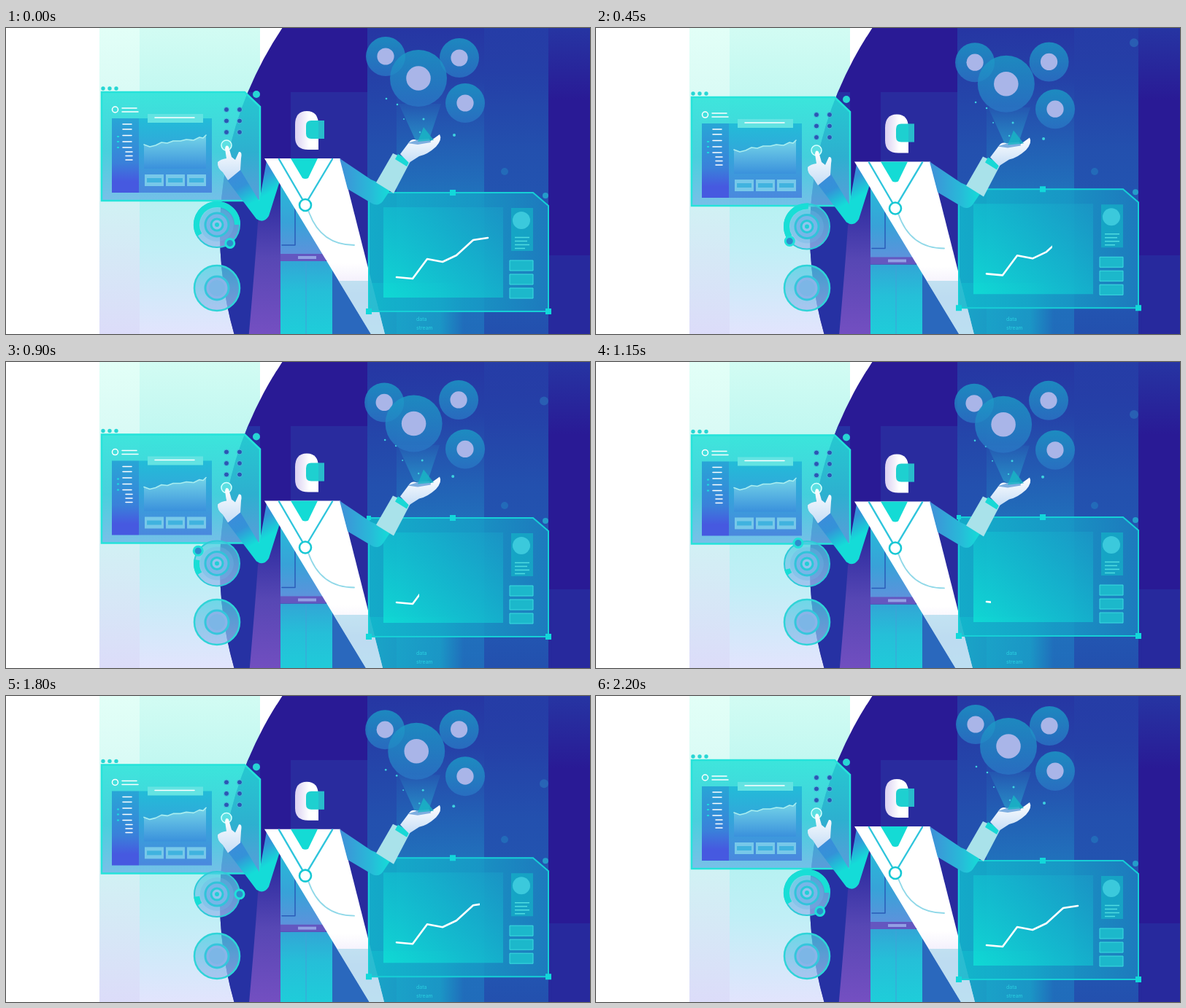
Animation of 800 by 420 pixels, one loop 2.25 s. Source, as an HTML page:

```html
<!DOCTYPE html>
<html lang="en">
<head>
<meta charset="utf-8">
<title>Robot with floating panels</title>
<style>
  html, body { margin: 0; width: 100%; height: 100%; overflow: hidden; background: #fff; }
  svg { display: block; width: 800px; height: 420px; }
  .line { fill: none; stroke-linecap: round; stroke-linejoin: round; }
  text { font: 7px Inter, sans-serif; fill: #2ad0e0; }
</style>
</head>
<body>
<svg viewBox="0 0 800 420">
  <defs>
    <linearGradient id="column" x2="0" y2="1">
      <stop stop-color="#d2fcf3"/><stop offset=".45" stop-color="#b0f3ef"/>
      <stop offset=".72" stop-color="#c0eff6"/><stop offset="1" stop-color="#e2e4fd"/>
    </linearGradient>
    <linearGradient id="edge" x2="0" y2="1">
      <stop stop-color="#e2fff7"/><stop offset=".5" stop-color="#cff5f3"/><stop offset="1" stop-color="#dcdcf9"/>
    </linearGradient>
    <linearGradient id="beam" x2="0" y2="1">
      <stop stop-color="#2636a3"/><stop offset=".4" stop-color="#2350ae"/>
      <stop offset=".8" stop-color="#225ab4"/><stop offset="1" stop-color="#2350ae"/>
    </linearGradient>
    <linearGradient id="core" x2="0" y2="1">
      <stop stop-color="#2468b8" stop-opacity="0"/><stop offset=".45" stop-color="#207cc0" stop-opacity=".75"/>
      <stop offset="1" stop-color="#1f78c0" stop-opacity=".7"/>
    </linearGradient>
    <linearGradient id="floorGlow">
      <stop stop-color="#18b4cc" stop-opacity=".85"/><stop offset=".75" stop-color="#18a8ca" stop-opacity=".7"/>
      <stop offset="1" stop-color="#18a8ca" stop-opacity="0"/>
    </linearGradient>
    <linearGradient id="haze" x2="0" y2="1">
      <stop stop-color="#2540a8" stop-opacity=".7"/><stop offset="1" stop-color="#2540a8" stop-opacity="0"/>
    </linearGradient>
    <linearGradient id="cape" x2="0" y2="1">
      <stop offset=".15" stop-color="#2b2b9f"/><stop offset=".5" stop-color="#5747b4"/><stop offset="1" stop-color="#7a51c4"/>
    </linearGradient>
    <linearGradient id="body" x2="0" y2="1">
      <stop stop-color="#23c0d8"/><stop offset=".6" stop-color="#38a2d8"/><stop offset="1" stop-color="#5d92dc"/>
    </linearGradient>
    <linearGradient id="legs" x2="0" y2="1">
      <stop stop-color="#32a6d6"/><stop offset=".35" stop-color="#25bfd8"/><stop offset="1" stop-color="#1cd2da"/>
    </linearGradient>
    <linearGradient id="cloth" x2="0" y2="1">
      <stop stop-color="#fff"/><stop offset=".55" stop-color="#fff"/><stop offset=".72" stop-color="#ece6fa"/>
      <stop offset="1" stop-color="#e8f4fc"/>
    </linearGradient>
    <linearGradient id="helmet"><stop stop-color="#d9d0f1"/><stop offset=".6" stop-color="#fff"/></linearGradient>
    <linearGradient id="rightArm"><stop stop-color="#3f8fd8"/><stop offset=".6" stop-color="#28bad8"/><stop offset="1" stop-color="#13dfd8"/></linearGradient>
    <linearGradient id="leftArm" x2=".5" y2="1"><stop stop-color="#4188dc"/><stop offset=".45" stop-color="#3492d8"/><stop offset=".75" stop-color="#14dcd8"/></linearGradient>
    <linearGradient id="skin" x2="0" y2="1"><stop stop-color="#fff"/><stop offset="1" stop-color="#c5ddf6"/></linearGradient>
    <linearGradient id="leftGlass" x2="0" y2="1">
      <stop stop-color="#25e2d8" stop-opacity=".86"/><stop offset=".55" stop-color="#2fc8d8" stop-opacity=".84"/>
      <stop offset="1" stop-color="#66b4e6" stop-opacity=".82"/>
    </linearGradient>
    <linearGradient id="menu" x2="0" y2="1">
      <stop stop-color="#28a6d6"/><stop offset=".6" stop-color="#3a80da"/><stop offset=".85" stop-color="#4659e0"/>
    </linearGradient>
    <linearGradient id="screen" x2="0" y2="1"><stop stop-color="#22bcd8"/><stop offset="1" stop-color="#4a88de"/></linearGradient>
    <linearGradient id="area" x2="0" y2="1"><stop stop-color="#75d5e8"/><stop offset="1" stop-color="#3a91dc"/></linearGradient>
    <linearGradient id="rightGlass">
      <stop stop-color="#11b8cc" stop-opacity=".86"/><stop offset=".6" stop-color="#169fc7" stop-opacity=".82"/>
      <stop offset="1" stop-color="#1c82c0" stop-opacity=".82"/>
    </linearGradient>
    <linearGradient id="plot" y1="1" y2="0">
      <stop stop-color="#0fe0d6" stop-opacity=".85"/><stop offset=".6" stop-color="#13bdd0" stop-opacity=".6"/>
      <stop offset="1" stop-color="#1a9cc8" stop-opacity=".55"/>
    </linearGradient>
    <linearGradient id="coin" x2="0" y2="1"><stop stop-color="#1b9cc6" stop-opacity=".8"/><stop offset="1" stop-color="#2a74c4" stop-opacity=".8"/></linearGradient>
    <linearGradient id="cone" x2="0" y2="1"><stop stop-color="#2a9fce" stop-opacity=".1"/><stop offset="1" stop-color="#2aa6d0" stop-opacity=".65"/></linearGradient>
    <linearGradient id="dial" x2="0" y2="1"><stop stop-color="#47cfe0" stop-opacity=".7"/><stop offset="1" stop-color="#9cb8ec" stop-opacity=".75"/></linearGradient>
    <path id="robe" d="M354 179H458L524 440H512Z"/>
    <clipPath id="robeClip"><use id="robeClipShape" href="#robe"/></clipPath>
    <clipPath id="disc"><circle cx="798" cy="281" r="505"/></clipPath>
    <clipPath id="drawn"><rect id="reveal" x="530" y="270" height="100"/></clipPath>
  </defs>

  <!-- Backdrop -->
  <path fill="url(#edge)" d="M128 0h55v420h-55z"/>
  <path fill="url(#column)" d="M183 0h165v420H183z"/>
  <g clip-path="url(#disc)">
    <path fill="#291a95" d="M280 0h520v420H280z"/>
    <path fill="#2638a8" opacity=".75" d="M280 88h68v332h-68z"/>
    <path fill="#2a30a1" opacity=".8" d="M390 88h105v332H390z"/>
    <path fill="url(#beam)" d="M495 0h248v420H495z"/>
    <path fill="url(#haze)" d="M655 0h145v100H655z"/>
    <path fill="url(#core)" d="M535 70h120v350H535z"/>
    <path fill="url(#floorGlow)" d="M497 350h130v70H497z"/>
    <path fill="#2540a8" opacity=".4" d="M743 312h57v108h-57z"/>
  </g>
  <circle id="mote" cx="737" r="6" fill="#2e84c4"/>
  <circle cx="683" cy="197" r="5" fill="#2389c6" opacity=".45"/>

  <!-- Left panel -->
  <g id="leftPanel">
    <path d="M131 88H327L348 108V237H131Z" fill="url(#leftGlass)" stroke="#25e3da" stroke-width="2.500"/>
    <g fill="#27d6d4"><circle cx="133" cy="83" r="2.700"/><circle cx="142" cy="83" r="2.700"/><circle cx="151" cy="83" r="2.700"/><circle cx="343" cy="91" r="5"/></g>
    <g class="line" stroke="#fff" stroke-width="1.500"><circle cx="149.500" cy="112" r="4"/><path d="M159 110h20M159 115h22"/></g>
    <path fill="url(#menu)" d="M145 124h37v102h-37z"/>
    <path fill="url(#screen)" d="M182 124h100v102H182z"/>
    <path fill="#63e3e2" d="M194 118h76v12h-76z"/>
    <path class="line" stroke="#fff" stroke-width="1.500" d="M204 123h54M160 132h12M160 139h12M160 147.500h12M160 156h12M160 164h12M164 170h9M164 175.500h9M164 181h9"/>
    <path fill="#1fd9dd" d="M152 148h3v2h-3zM152 155h3v2h-3zM152 163h3v2h-3z"/>
    <path fill="url(#area)" d="M189 160l8 3 8-2 8-4 8 1 8-3 10 0 8-2 10 1 8-4 5 1 4-4V193H189Z"/>
    <path class="line" stroke="#a9eef0" stroke-width="1.600" d="M189 160l8 3 8-2 8-4 8 1 8-3 10 0 8-2 10 1 8-4 5 1 4-4"/>
    <g id="tabs"></g>
    <g id="knobs" fill="#2c56b4" stroke="#49c4de"></g>
    <circle cx="302" cy="161" r="7" fill="#5ce0e2" stroke="#d5ffff" stroke-width="1.500"/>
  </g>

  <!-- Dials -->
  <g id="dialA">
    <circle r="31" fill="url(#dial)" stroke="#2fcbd8" stroke-width="2"/>
    <circle r="23" fill="#6fb6e6" opacity=".35"/>
    <circle r="16" fill="#78b6e8" stroke="#31c4da" stroke-width="3"/>
    <circle r="8" fill="#91c4ee" stroke="#29c9d8" stroke-width="3"/>
    <circle r="3" fill="#21cfd6"/>
    <path id="sweep" fill="none" stroke="#18ded6" stroke-width="8"/>
    <circle id="knob" r="6" fill="#2f8ccc" stroke="#1fe0da" stroke-width="3"/>
  </g>
  <g transform="translate(289 357)">
    <circle r="31" fill="url(#dial)" stroke="#2fd4d8" stroke-width="2.500"/>
    <circle r="16" fill="#8ab4e8" stroke="#35c7dc" stroke-width="3"/>
    <circle r="11" fill="#7cb6e6"/>
  </g>

  <!-- Robot -->
  <g id="robot">
    <path fill="url(#cape)" d="M357 190H376V440H331Q340 340 345 268Z"/>
    <path fill="url(#body)" d="M376 200h25l50 80v31h-75z"/>
    <path class="line" stroke="#2a5cb8" stroke-width="1.500" d="M396 238V298M378 298h18"/>
    <path fill="url(#legs)" d="M376 320h71v120h-71z"/>
    <path fill="#2a68bd" d="M447 320h20l55 120h-75z"/>
    <path stroke="#42a0d8" d="M411 322V440"/>
    <path fill="#6457c0" d="M376 310h62v10h-62z"/>
    <path fill="#92a0e4" d="M400 313h25v4h-25z"/>
    <path fill="url(#leftArm)" d="M303 209L320 193 347 238 357 182 376 207 360 258Q353 269 343 262Z"/>
    <use href="#robe" fill="url(#cloth)"/>
    <path fill="#14dbd5" d="M390 179h37l-13 27q-4 2-8 0z"/>
    <g class="line" stroke="#2fc5dc">
      <path d="M374 180L410 242 447 180" stroke-width="2.400"/>
      <path d="M414 250Q430 298 477 298" stroke="#8fd8e8" stroke-width="1.800"/>
      <circle cx="410" cy="243" r="8" fill="#fff" stroke="#17c8d4" stroke-width="2.600"/>
    </g>
    <path fill="url(#helmet)" d="M396 133Q396 114 412 114T428 133V167H414Q396 167 396 150Z"/>
    <path fill="#1ed0d0" d="M411 134q0-7 7-7h18v25h-18q-7 0-7-7z"/>
    <path fill="#3f8fc4" d="M428 127h8v25h-8z" opacity=".3"/>
  </g>
  <path id="leftHand" fill="url(#skin)" d="M304 209L297 198Q289 192 290 184 294 180 302 179L300 166Q301 159 305 163L309 177 314 181 319 170Q324 169 322 179L321 195Z"/>
  <path clip-path="url(#robeClip)" fill="#9fd6ec" opacity=".6" d="M350 347h180v73H350z"/>

  <!-- Coins -->
  <g id="glow">
    <path fill="url(#cone)" d="M538 104H596L580 152Q570 160 560 152Z"/>
    <g fill="#3ed2df"><circle cx="521" cy="97" r="1.300"/><circle cx="536" cy="105" r="1.300"/><circle cx="572" cy="125" r="1.500"/><circle cx="545" cy="125" r="1"/><circle cx="614" cy="147" r="2"/><circle cx="567" cy="143" r="1.200"/></g>
  </g>
  <g id="coins"></g>

  <!-- Right panel -->
  <text x="562" y="402">data</text><text x="562" y="414">stream</text>
  <g id="rightPanel">
    <path d="M497 226H722L743 244V389H497Z" fill="url(#rightGlass)" stroke="#16cfd6" stroke-width="2"/>
    <path fill="url(#plot)" d="M517 246h164v124H517z"/>
    <path fill="#13b5c8" opacity=".65" d="M692 247h30v59h-30z"/>
    <circle cx="706" cy="264" r="12" fill="#3bc9dc"/>
    <path stroke="#4fdbe0" stroke-width="1.500" d="M697 287.500h20M697 292.500h17M697 297.500h20M697 302.500h14"/>
    <g id="buttons" fill="#1cb8cb" stroke="#3bdde0"></g>
    <path fill="#12d8da" d="M608 222h8v8h-8zM493 385h8v8h-8zM739 385h8v8h-8zM494 223h6v6h-6z"/>
    <circle cx="739" cy="230" r="4" fill="#249cca"/>
    <path class="line" clip-path="url(#drawn)" stroke="#fff" stroke-width="2.600" d="M535 342L557 344 577 317 598 321 617 312 640 291 660 288"/>
  </g>

  <!-- Raised arm, in front of the panel -->
  <g id="raisedArm">
    <path fill="url(#rightArm)" d="M457 179L500 208 528 220 516 238Q509 246 500 240L468 221Z"/>
    <path fill="#a9e2ea" d="M530 172L554 183 531 227 507 212Z"/>
    <path fill="#18d8d6" d="M537 173L553 182 549 190 533 180Z"/>
    <path fill="url(#skin)" d="M540 173L552 157Q556 151 563 154L580 156 594 146Q598 153 589 163 577 174 566 176L552 185Z"/>
    <path fill="#7daee0" d="M550 158l14 2 18-3-2-5-14 1z"/>
    <path fill="#18b7c4" opacity=".8" d="M572 136l14 18-22 2z"/>
  </g>
</svg>
<script>
const $ = id => document.getElementById(id);
const move = (id, x, y) => $(id).setAttribute('transform', `translate(${x} ${y})`);

// x, y, radius, then the drift from the top pose to the bottom pose
const coins = [[520, 39, 27, -2, 18], [621, 41, 27, -1, 12], [629, 103, 27, 0, 18], [565, 69, 39, -7, 17]];
$('coins').innerHTML = coins.map(([, , r], i) =>
  `<g id="coin${i}"><circle r="${r}" fill="url(#coin)"/><circle r="${r * .43}" fill="#a9b5e8"/></g>`).join('');

$('tabs').innerHTML = [190, 219, 248].map(x =>
  `<path fill="#77c8e9" d="M${x} 201h26v16h-26z"/><path fill="#40b3df" d="M${x + 3} 206h20v6h-20z"/>`).join('');
$('knobs').innerHTML = [112, 127.5, 143].map(y =>
  [302, 320].map(x => `<circle cx="${x}" cy="${y}" r="3.5"/>`).join('')).join('');
$('buttons').innerHTML = [319, 338, 357].map(y => `<path d="M690 ${y}h32v14h-32z"/>`).join('');

// Linear interpolation through [step, value] pairs
function along(keys, n) {
  const i = Math.max(1, keys.findIndex(k => k[0] >= n));
  const [a, u] = keys[i - 1], [b, v] = keys[i];
  return u + (v - u) * (n - a) / (b - a);
}
const orbit = [[0, 55], [5, 102], [14, 187], [23, 247], [30, 295], [36, 360], [44, 415]];
const arcSpan = [[0, 210], [5, 175], [14, 60], [23, 15], [27, 0], [35, 0], [44, 210]];
const chartEnd = [[0, 663], [5, 648], [14, 596], [22, 536], [23, 541], [30, 621], [36, 649], [44, 663]];

const polar = (deg, r) => {
  const a = deg * Math.PI / 180;
  return [r * Math.cos(a), r * Math.sin(a)];
};

function draw(now) {
  const n = Math.floor((now % 2250) / 50);
  const x = 1 - Math.abs(n - 22) / 22;
  const sine = (1 - Math.cos(Math.PI * x)) / 2;
  const quick = x * (1.6 - .6 * x);
  const sink = (sine + quick) / 2;

  for (const id of ['leftPanel', 'leftHand']) move(id, 0, 12.7 * quick);
  for (const id of ['robot', 'robeClipShape', 'raisedArm']) move(id, 0, 12.5 * sine);
  move('glow', -2 * sink, 11 * sink);
  move('rightPanel', 0, -13 * sine);
  coins.forEach(([cx, cy, , dx, dy], i) => move('coin' + i, cx + dx * sink, cy + dy * sink));

  move('dialA', 289, 270 + 7 * sine);
  move('knob', ...polar(along(orbit, n), 31));
  const span = along(arcSpan, n);
  $('sweep').setAttribute('d', span ?
    `M${polar(150, 28)}A28 28 0 ${+(span > 180)} 1 ${polar(150 + span, 28)}` : '');

  $('reveal').setAttribute('width', along(chartEnd, n) - 530);
  $('mote').setAttribute('cy', 3.7 * n - 13);
  $('mote').setAttribute('opacity', n > 1 && n < 42 ? .45 : 0);
  requestAnimationFrame(tick);
}
const tick = () => draw(performance.now());
tick();
</script>
</body>
</html>
```
